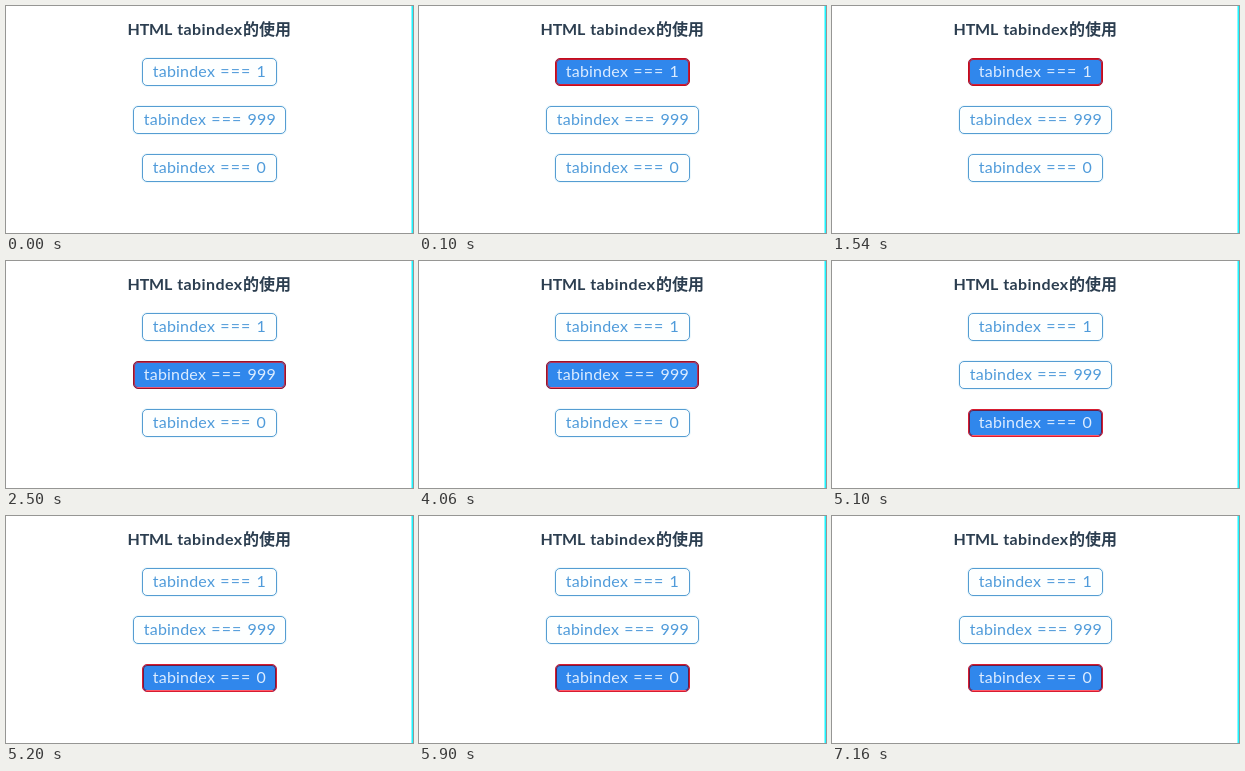
An HTML page that plays this animation: 407x227 px, repeating every 8 s.

```html
<!DOCTYPE html>
<html lang="zh-CN">
<head>
<meta charset="utf-8">
<style>
  html, body { margin: 0; width: 100%; height: 100%; overflow: hidden; background: #fff; }
  svg { display: block; width: 407px; height: 227px; }
  text { font-family: Lato, "Noto Sans CJK SC", "Noto Sans CJK", sans-serif; font-size: 16px; }
  .title { font-weight: 700; fill: #2c3e50; letter-spacing: -.2px; }
  .word { letter-spacing: .4px; }
  .cjk { font-family: "Noto Sans CJK SC", "Noto Sans CJK", sans-serif; letter-spacing: 0; }
  .label { fill: #4f9bda; letter-spacing: .2px; word-spacing: .9px; }
  .equals { letter-spacing: 1.1px; }
  .halo { fill: none; stroke: #edf8fd; stroke-width: 3; }
  .box { fill: #fdffff; stroke: #559dd2; }
  .focus { visibility: hidden; }
  .focus .label { fill: #dcecff; }
  .fill { fill: #3087ec; }
  .ring { fill: none; }
</style>
</head>
<body>
<svg id="stage" viewBox="0 0 407 227">
  <rect x="405.5" width="1.5" height="227" fill="#1cf4ff"/>
  <text class="title" x="121.5" y="29">HTML <tspan class="word" x="171.2">tabindex</tspan><tspan class="cjk" x="237">的使用</tspan></text>
</svg>
<script>
const LOOP = 8000;
const buttons = [
  { value: 1, x: 136, y: 52, w: 135, from: 100, to: 2500, outer: '#c40c1c', inner: '#c01a34', base: '#d02038' },
  { value: 999, x: 127, y: 100, w: 153, from: 2500, to: 5100, outer: '#9c1228', inner: '#b03458', base: '#ec5a74' },
  { value: 0, x: 136, y: 148, w: 135, from: 5100, to: LOOP, outer: '#d81c30', inner: '#6a1c44', base: '#ff5a68' }
];
const stage = document.getElementById('stage');

function add(parent, tag, attrs, text = '') {
  const el = document.createElementNS('http://www.w3.org/2000/svg', tag);
  for (const key in attrs) el.setAttribute(key, attrs[key]);
  el.textContent = text;
  return parent.appendChild(el);
}

function box(parent, b, inset, cls, extra) {
  return add(parent, 'rect', {
    class: cls, x: b.x + inset, y: b.y + inset,
    width: b.w - 2 * inset, height: 28 - 2 * inset, rx: 5 - inset, ...extra
  });
}

function label(parent, b) {
  const text = add(parent, 'text', { class: 'label', x: b.x + 10.8, y: b.y + 19 }, 'tabindex ');
  add(text, 'tspan', { class: 'equals' }, '===');
  text.append(` ${b.value}`);
}

for (const b of buttons) {
  b.normal = add(stage, 'g', {});
  box(b.normal, b, .5, 'halo');
  box(b.normal, b, .5, 'box');
  label(b.normal, b);

  b.focus = add(stage, 'g', { class: 'focus' });
  box(b.focus, b, .5, 'fill');
  box(b.focus, b, 1.5, 'ring', { stroke: b.inner });
  add(b.focus, 'path', { d: `M${b.x + 4} ${b.y + 26.5}h${b.w - 8}`, stroke: b.base });
  box(b.focus, b, .5, 'ring', { stroke: b.outer });
  label(b.focus, b);
}

function draw(now) {
  const t = now % LOOP;
  for (const b of buttons) {
    const on = t >= b.from && t < b.to;
    b.focus.style.visibility = on ? 'visible' : 'hidden';
    b.normal.style.visibility = on ? 'hidden' : 'visible';
  }
}

const start = performance.now();
function tick() {
  draw(performance.now() - start);
  requestAnimationFrame(tick);
}
tick();
</script>
</body>
</html>
```
